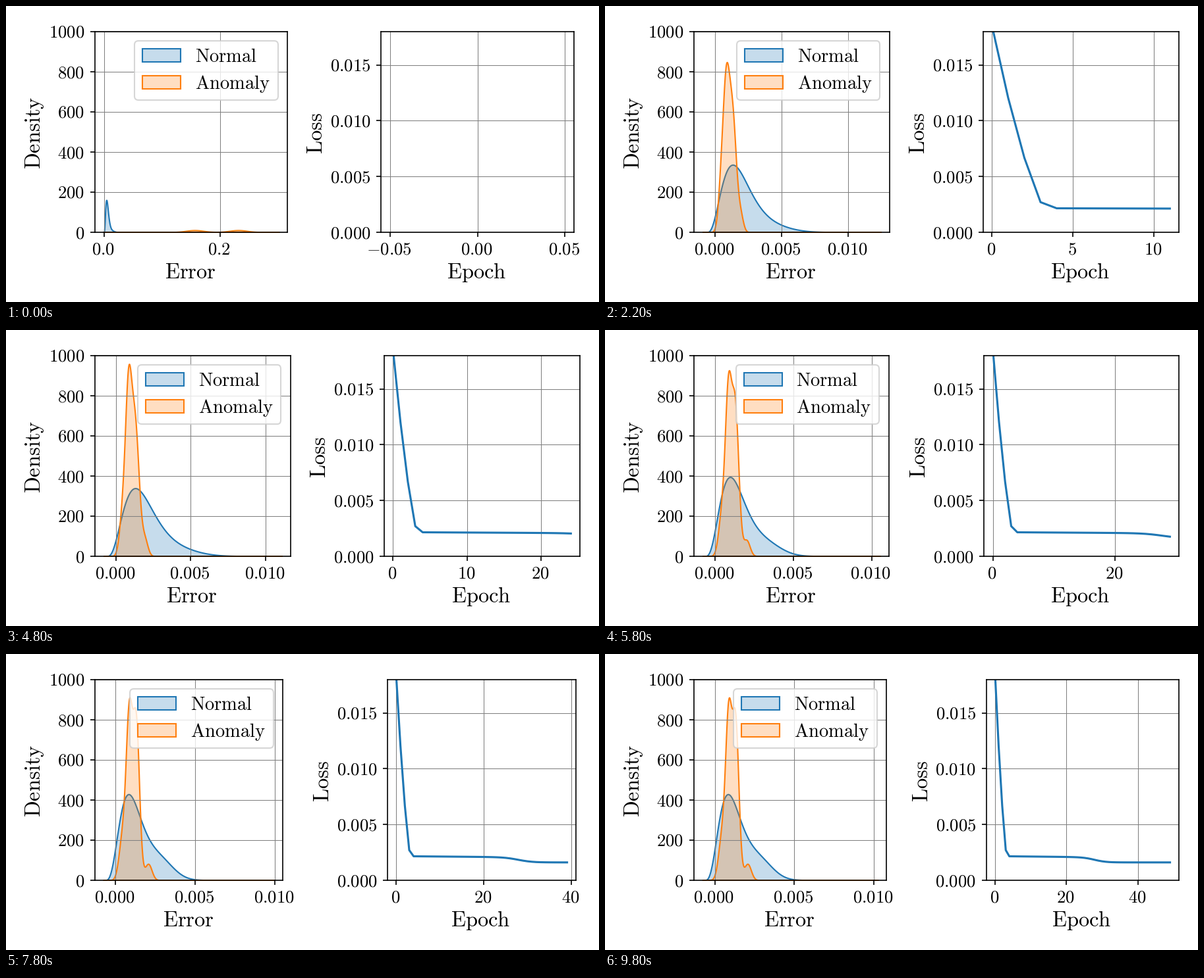
Recreate the animation shown at these times as a matplotlib script. Size 900 by 450 pixels, loop 10 s.

```python
import numpy as np
import matplotlib.pyplot as plt
from matplotlib.animation import FuncAnimation
from matplotlib.colors import to_rgba
from matplotlib.patches import FancyBboxPatch, Rectangle
from matplotlib.ticker import MaxNLocator
from matplotlib.transforms import Affine2D

plt.rcParams["mathtext.fontset"] = "cm"

W, H, DPI = 900, 450, 150
LEFT, RIGHT, TOP, BOTTOM = 135, 870.8, 38.8, 343.8
GAP = 142
TICK, LEGEND, LABEL = 12.85, 13.7, 15.6
EPOCHS = 50
BLUE, ORANGE = "C0", "C1"

fig = plt.figure(figsize=(W / DPI, H / DPI), dpi=DPI, facecolor="white")
PX = Affine2D().scale(1 / W, -1 / H).translate(0, 1) + fig.transFigure

# Shape of the error densities in four training stages, errors in thousandths.
# Normal: height, reach left of the mode, mode, steepness, tail share.
NORMAL = np.array([(160, 4.5, 4, 3.2, .03), (333, 2.01, 1.36, 3.2, .03),
                   (338, 1.93, 1.28, 3.2, .04), (425, 1.52, .82, 4.2, .17)])
# Anomaly: height, centre and width of two humps.
ANOMALY = np.array([(9.5, 156, 15, 9.5, 231, 15), (620, .8, .28, 500, 1.33, .3),
                    (745, .8, .21, 650, 1.25, .27), (805, .86, .2, 760, 1.3, .2)])


def loss_curve():
    n = np.arange(EPOCHS)
    plateau = 2.14 - .0035 * np.clip(n - 4, 0, 28)
    drop = .45 / (1 + np.exp(-(n - 27.8) / 1.6))
    loss = (plateau - drop) / 1000
    loss[:4] = .0185, .01204, .00667, .00269
    return loss


LOSS = loss_curve()


def fall(n, a, b):
    """Share of the loss drop between epochs a and b that is done by n."""
    return np.clip((LOSS[a] - LOSS[n]) / (LOSS[a] - LOSS[b]), 0, 1)


def mix(a, b, u):
    return a ** (1 - u) * b ** u


def shape(stages, n):
    s = fall(n, 0, 6) + np.clip((n - 6) / 11, 0, 1) + fall(n, 24, 36)
    i = min(int(s), len(stages) - 2)
    return mix(stages[i], stages[i + 1], s - i)


def hump(x, height, centre, width):
    return height * np.exp(-((x - centre) / width) ** 2 / 2)


def normal_density(x, n):
    height, reach, mode, steep, tail = shape(NORMAL, n)
    z = np.clip((x - mode) / reach + 1, 1e-9, None)
    return (height * (z * np.exp(1 - z)) ** steep
            + hump(x, tail * height, 3.5 * mode, mode))


def anomaly_density(x, n):
    h1, c1, w1, h2, c2, w2 = shape(ANOMALY, n)
    side = h1 * fall(n, 0, 6)
    return (hump(x, h1, c1, w1) + hump(x, h2, c2, w2)
            + hump(x, side / 4, c1 / 2, c1 / 4)
            + hump(x, side / 10, 2.4 * c1, c1 / 4))


def error_span(n):
    warm = fall(n, 0, 6)
    settled = np.interp(n, [6, 17, 24, 33, 39, 49],
                        [12.85, 13.45, 11.68, 10.62, 10.5, 10.79])
    hi = mix(315.9, settled, warm)
    return -hi * mix(.05, .1215, warm), hi


def tick_set(lo, hi):
    ticks = MaxNLocator(3, steps=[1, 2, 2.5, 5, 10]).tick_values(lo, hi)
    ticks = np.array([t for t in ticks if lo <= t <= hi])
    places = 0
    while not np.allclose(ticks, np.round(ticks, places), rtol=0, atol=1e-6):
        places += 1
    return ticks, [f"{t + 0.0:.{places}f}" for t in ticks]


def half_width(label):
    return 12.6 * sum(.278 if c == "." else .5 for c in label)


def overhang(lim, ticks, labels, width):
    """Pixels by which the last tick label passes the right spine."""
    gap = (lim[1] - ticks[-1]) / (lim[1] - lim[0]) * width
    return max(0, half_width(labels[-1]) - gap)


def layout(err, epo):
    width = 297
    for _ in range(8):
        inner = overhang(*err, width)
        outer = overhang(*epo, width)
        width = (RIGHT - LEFT - GAP - inner - outer) / 2
    return width, LEFT + width + GAP + inner


def write(x, y, s, size, **kw):
    fig.text(x, y, rf"$\mathrm{{{s}}}$", size=size, transform=PX,
             va="baseline", rotation_mode="anchor", **kw)


def make_axes(left, width, xaxis, yticks, ylabels, ymax, xname, yname, ydist):
    lim, ticks, labels = xaxis
    ax = fig.add_axes([left / W, 1 - BOTTOM / H, width / W, (BOTTOM - TOP) / H])
    ax.set(xlim=lim, ylim=(0, ymax), xticks=ticks, yticks=yticks)
    ax.tick_params(labelleft=False, labelbottom=False)
    ax.grid(color="gray", lw=.5)
    for t, s in zip(ticks, labels):
        x = left + (t - lim[0]) / (lim[1] - lim[0]) * width
        write(x - 1.3, 378, s, TICK, ha="center")
    for t, s in zip(yticks, ylabels):
        y = BOTTOM - t / ymax * (BOTTOM - TOP)
        write(left - 15.5, y + 9.2, s, TICK, ha="right")
    write(left + width / 2 - 1.4, 414, xname, LABEL, ha="center")
    write(left - ydist, 193.3, yname, LABEL, ha="center", rotation=90)
    return ax


def draw_legend(right):
    fig.add_artist(FancyBboxPatch(
        (right - 232, 53.4), 217.5, 89.6, transform=PX, snap=True, alpha=.8,
        boxstyle="round,pad=0,rounding_size=5.8", fc="white", ec="0.8", lw=1))
    for y, color, name in ((65, BLUE, "Normal"), (106, ORANGE, "Anomaly")):
        fig.add_artist(Rectangle((right - 220, y), 58, 20, transform=PX,
                                 fc=to_rgba(color, .25), ec=color, lw=1))
        write(right - 140.3, y + 20, name, LEGEND, ha="left")


def draw(n):
    fig.clear()
    lo, hi = error_span(n)
    err_lim = (lo / 1000, hi / 1000)
    epo_lim = (-.05 * n, 1.05 * n) if n else (-.055, .055)
    err = (err_lim, *tick_set(*err_lim))
    epo = (epo_lim, *tick_set(*epo_lim))
    width, left2 = layout(err, epo)

    dens = np.arange(0, 1001, 200)
    ax = make_axes(LEFT, width, err, dens, [str(d) for d in dens], 1000,
                   "Error", "Density", 83)
    pad = .045 * (hi - lo)
    x = np.linspace(lo + pad, hi - pad, 1500)
    for curve, color in ((normal_density, BLUE), (anomaly_density, ORANGE)):
        ax.fill_between(x / 1000, curve(x, n),
                        fc=to_rgba(color, .25), ec=color, lw=1)
    draw_legend(LEFT + width)

    steps = np.arange(4) * .005
    ax = make_axes(left2, width, epo, steps, [f"{s:.3f}" for s in steps], .018,
                   "Epoch", "Loss", 89)
    ax.plot(np.arange(n + 1), LOSS[:n + 1], color=BLUE, lw=1.5)


anim = FuncAnimation(fig, draw, frames=EPOCHS, interval=200, repeat=True)
plt.show()
```
